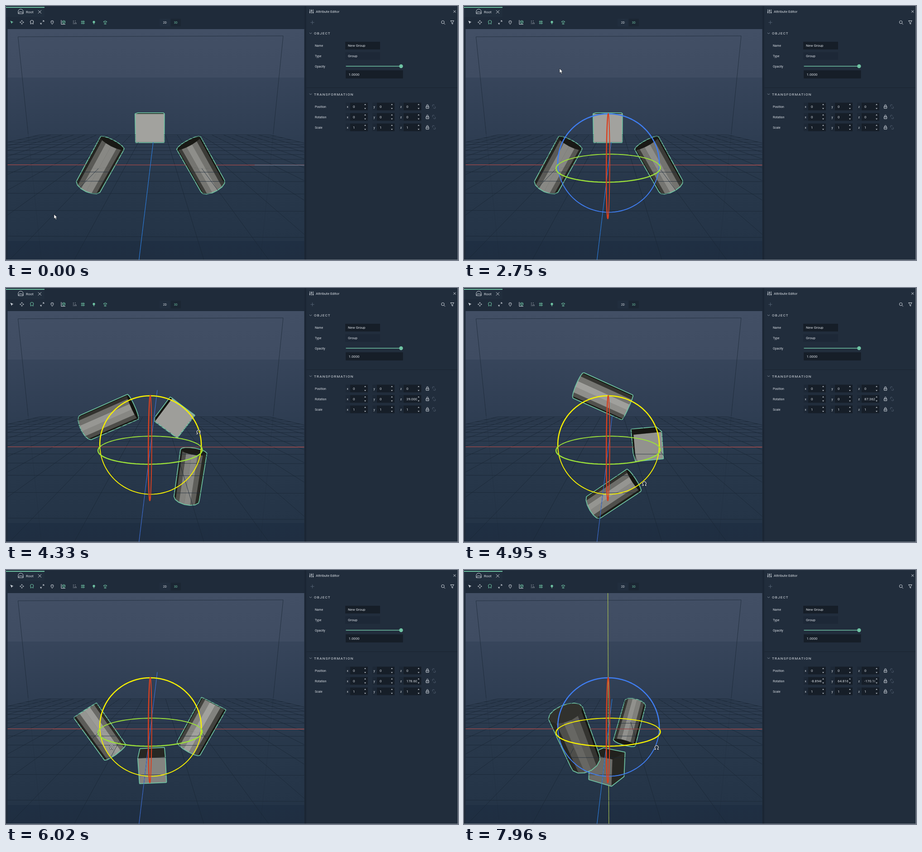
An HTML page for the animation above (8 s loop, 998x561 px).

```html
<!DOCTYPE html>
<html lang="en">
<head>
<meta charset="utf-8">
<title>Group rotation</title>
<style>
  html, body { margin: 0; width: 100%; height: 100%; overflow: hidden; background: #1e2a39; }
  svg { display: block; width: 100vw; height: 100vh; }
  text { font-family: Roboto, "Open Sans", sans-serif; font-size: 7.8px; fill: #d9dee4; }
  .label { font-size: 6.8px; }
  .head { font-size: 8px; letter-spacing: 1.25px; }
  .line { fill: none; stroke: #d3d9e0; stroke-width: 1; }
  .mint { fill: none; stroke: #6fc3a3; stroke-width: 1; }
  .dim { fill: none; stroke: #536173; stroke-width: 1; }
  .field { fill: #161e28; }
</style>
</head>
<body>
<svg viewBox="0 0 998 561" preserveAspectRatio="none">
  <defs>
    <linearGradient id="sky" x1="0" y1="51" x2="0" y2="560" gradientUnits="userSpaceOnUse">
      <stop offset="0" stop-color="#424f65"/>
      <stop offset=".21" stop-color="#3f4c62"/>
      <stop offset=".21" stop-color="#37455b"/>
      <stop offset=".45" stop-color="#2f3e53"/>
      <stop offset=".65" stop-color="#28384b"/>
      <stop offset=".92" stop-color="#243447"/>
      <stop offset=".92" stop-color="#1f2f43"/>
      <stop offset="1" stop-color="#1f2e41"/>
    </linearGradient>
    <clipPath id="view"><rect x="3.5" y="51" width="655" height="509.5"/></clipPath>
  </defs>

  <rect width="998" height="561" fill="#1f2b3a"/>
  <rect x="659" width="4" height="561" fill="#1b2634"/>
  <rect x="663" width="334" height="560" fill="#212d3c"/>

  <!-- tab and toolbar -->
  <rect width="85" height="24" fill="#212e3d"/>
  <rect width="85" height="2" y="2" fill="#6fc3a3"/>
  <path class="line" d="M27 17V11.500Q28 7 32.500 7T38 11.500V17ZM28 16l3-4 2 2 2-1.500 3 3.500M71 9.500l7 7m0-7l-7 7" stroke-width="1.300"/>
  <text x="44" y="15.500" style="font-size:8px">Root</text>
  <path id="pick" d="M9.500 32.500l7 3-3 1-1 3z"/>
  <path class="line" d="M35 32v2.500m0 3V40M31 36h2.500m3 0H39M33.500 33.200L35 31.700l1.500 1.500M33.500 38.800l1.500 1.500 1.500-1.500M32.200 34.500L30.700 36l1.500 1.500M37.800 34.500l1.500 1.500-1.500 1.500"/>
  <path id="turn" d="M53.500 39.500h2.200v-1.300a3.500 3.500 0 1 1 3 0v1.300h2.200" fill="none" stroke-width="1.100"/>
  <path class="line" d="M81 35l2.500-2.500M81 32.200h2.800V35M79 37l-2.500 2.500M76.200 37v2.800H79"/>
  <path class="line" d="M102 40.300q-3-3.300-3-5a3 3 0 0 1 6 0q0 1.700-3 5z"/><circle cx="102" cy="35.300" r=".8" fill="#d3d9e0"/>
  <path class="line" d="M122 31v9.500h9"/><path class="mint" d="M124.500 33.500l3-1.500 3 1.500v4l-3 1.500-3-1.500zl3 1.500 3-1.500m-3 1.500v4"/>
  <path class="line" d="M148 33h1.500m-1.500 3h1.500m-1.500 3h1.500M152 40v-2a1.500 1.500 0 0 1 3 0v2M152 33h1.500" stroke-dasharray="1.800 .7"/>
  <path class="mint" d="M168 32v8.500m3.500-8.500v8.500M165.500 34.300h8.500m-8.500 3.700h8.500"/>
  <path d="M192.800 38q-1.800-1.500-1.500-3a2.800 2.800 0 0 1 5.500 0q.2 1.500-1.500 3zM192.800 38.700h2.500V40h-2.500z" fill="#6fc3a3"/>
  <path class="mint" d="M215 35q4-4 8 0-4 3-8 0zM216.500 39.500q2.500-2 5 0-2.500 1.500-5 0z" stroke-width="1.300"/>
  <rect x="339" y="28" width="23" height="17" fill="#212e3e"/>
  <rect x="364" y="28" width="22" height="17" fill="#1b2633"/>
  <text x="346.800" y="38.500" style="font-size:6.600px">2D</text>
  <text x="370.800" y="38.500" style="font-size:6.600px;fill:#6fc3a3">3D</text>

  <!-- attribute panel -->
  <path class="line" d="M671 7.500v9m3.500-9v9m3.500-9v9M669.500 13.500h3m.5-3h3m.5 4h3" stroke-width="1.200"/>
  <text x="684" y="15">Attribute Editor</text>
  <path class="line" d="M988 9.700l5 5m0-5l-5 5"/>
  <path class="dim" d="M672.500 36.300h8m-4-4v8"/>
  <path class="line" d="M967 38.300l2.500 2.500M981.500 32.500h7.500l-2.700 4v3.500l-2-1.200v-2.300z" stroke-width="1.200"/>
  <circle class="line" cx="964.500" cy="35.700" r="3.200"/>
  <path class="dim" d="M670 59l2.500 2.500 2.500-2.500M670 193.500l2.500 2.500 2.500-2.500" style="stroke:#8793a2"/>
  <text class="head" x="680" y="62.800">OBJECT</text>
  <text class="head" x="680" y="197.500">TRANSFORMATION</text>
  <text class="label" x="682" y="90">Name</text>
  <text class="label" x="682" y="113">Type</text>
  <text class="label" x="682" y="135.700">Opacity</text>
  <rect class="field" x="749" y="79" width="77" height="17"/>
  <rect x="749" y="102" width="77" height="17" fill="#1d2837"/>
  <rect class="field" x="750" y="142" width="126.500" height="18"/>
  <text x="755" y="90.300">New Group</text>
  <text x="755" y="113.300">Group</text>
  <text x="756.500" y="154">1.0000</text>
  <path d="M750.500 133H872" stroke="#6fc3a3" stroke-width="1.500"/>
  <circle cx="872.300" cy="133" r="4.200" fill="#6fc3a3"/>
  <path d="M663 180.500H997" stroke="#1a2431"/>
  <g id="rows"></g>

  <!-- 3D view -->
  <g clip-path="url(#view)">
    <rect x="3" y="51" width="656" height="510" fill="url(#sky)"/>
    <g fill="none" stroke="#1c2938">
      <path d="M49 283L26.500 68 612 66 590 283" stroke-width=".9" opacity=".85"/>
      <path d="M49 283L78 560M590 283L562 560" opacity=".25"/>
    </g>
    <path id="upright" stroke="#a9c254" stroke-width="1.200"/>
    <g id="below"></g>
    <path id="grid" fill="none" stroke="#1a2735" stroke-width=".9" opacity=".85"/>
    <path id="redAxis" stroke="#cb5450" stroke-width="1.100"/>
    <path id="greyAxis" stroke="#7189a0"/>
    <path id="blueAxis" stroke="#2f83e6" stroke-width="1.100"/>
    <g id="above"></g>
    <g id="gizmo" fill="none" stroke-linecap="round"></g>
  </g>
  <path d="M0 560.700H997.600V0" fill="none" stroke="#b4bac1" stroke-width=".7"/>

  <path id="arrow" d="M0 0v10l2.300-2.100 1.700 3.700 1.700-.8-1.600-3.500H7z" fill="#fff" stroke="#10161d" stroke-width=".7"/>
  <g id="loop" fill="none">
    <path d="M-5 4.500h3V3a4 4 0 1 1 4.500 0v1.500H5" stroke="#141b23" stroke-width="2.600"/>
    <path d="M-5 4.500h3V3a4 4 0 1 1 4.500 0v1.500H5" stroke="#f1f3f5" stroke-width="1.200"/>
  </g>
</svg>

<script>
const $ = id => document.getElementById(id);
const DURATION = 8000, CELL = 0.48, RAD = Math.PI / 180;
const SHOW_GIZMO = 2250, GRAB_Z = 3380, GRAB_Y = 6710;
const LAG = 40; // the solids trail the numbers in the panel

const TICKS = [0, 120, 260, 400, 550, 690, 830, 980, 1120, 1270, 1410, 1540, 1690, 1840,
  2250, 2370, 2490, 2610, 2740, 2860, 2980, 3110, 3230, 3380, 3520, 3650, 3900, 4040, 4180, 4330,
  4470, 4590, 4710, 4830, 4950, 5090, 5250, 5420, 5570, 5710, 5860, 6020, 6150,
  6710, 6850, 6990, 7120, 7260, 7400, 7590, 7720, 7840, 7960];

const MOUSE = [[0, 106, 460], [260, 104, 430], [550, 99, 330], [830, 91, 215], [1120, 83, 126],
  [1540, 68, 53], [1840, 56, 32], [2250, 56, 32], [3230, 366, 244], [3650, 375, 254],
  [4330, 425, 318], [4650, 428, 380], [4950, 398, 432], [5420, 297, 450], [6020, 233, 391],
  [6150, 230, 384], [6850, 230, 384], [7400, 278, 397], [7960, 425, 392]];
const SPIN = [[3520, 0], [3650, 3.6954], [3900, 13], [4330, 39], [4950, 87.3624], [5420, 138],
  [5860, 172], [6020, 178.6042], [6110, 184.158]];
const TURN = [[6990, 0], [7120, 3], [7260, 8.5], [7400, 14.994], [7590, 28], [7720, 40], [7960, 65.14]];

function at(keys, t) {
  if (t <= keys[0][0]) return keys[0].slice(1);
  const i = keys.findIndex(k => k[0] > t);
  if (i < 0) return keys[keys.length - 1].slice(1);
  const a = keys[i - 1], b = keys[i], f = (t - a[0]) / (b[0] - a[0]);
  return a.slice(1).map((v, j) => v + (b[j + 1] - v) * f);
}

// camera
const EYE = [0.108, 1.109, 4.12], LAMP = [0, 0.93, 3.5];
const depth = ([x, y, z]) => 4.25 - 0.166 * y - 0.986 * z - 0.01 * x;
function project(p) {
  const [x, y, z] = p, s = 476 / depth(p);
  return [331 + s * (x - 0.108 - 0.0064 * z), 305 - s * (0.986 * y - 0.411 - 0.166 * z)];
}
const path = pts => "M" + pts.map(p => p[0].toFixed(2) + " " + p[1].toFixed(2)).join("L");
const wire = (...pts) => path(pts.map(project));

// vectors
const sub = (a, b) => a.map((v, i) => v - b[i]);
const dot = (a, b) => a[0] * b[0] + a[1] * b[1] + a[2] * b[2];
const unit = a => a.map(v => v / Math.hypot(...a));
const cross = (a, b) => [a[1] * b[2] - a[2] * b[1], a[2] * b[0] - a[0] * b[2], a[0] * b[1] - a[1] * b[0]];
const middle = pts => [0, 1, 2].map(i => pts.reduce((s, p) => s + p[i], 0) / pts.length);
function rotZ([x, y, z], a) {
  const c = Math.cos(a), s = Math.sin(a);
  return [x * c - y * s, x * s + y * c, z];
}
function rotY([x, y, z], a) {
  const c = Math.cos(a), s = Math.sin(a);
  return [x * c + z * s, y, z * c - x * s];
}

function prism(n, radius, height, [px, py], tilt, phase) {
  const points = [], faces = [[], []];
  for (let i = 0; i < n; i++) {
    const a = phase + i * 2 * Math.PI / n, next = (i + 1) % n;
    for (const side of [-0.5, 0.5]) {
      const [x, y, z] = rotZ([radius * Math.cos(a), side * height, radius * Math.sin(a)], tilt);
      points.push([x + px, y + py, z]);
    }
    faces[0].push(2 * i);
    faces[1].push(2 * i + 1);
    faces.push([2 * i, 2 * i + 1, 2 * next + 1, 2 * next]);
  }
  return { points, faces };
}
const SOLIDS = [
  prism(4, 0.505 / Math.SQRT2, 0.505, [0, 0.75], 0, Math.PI / 4),
  prism(14, 0.25, 1, [-0.99, 0], -30 * RAD, 0.1),
  prism(14, 0.25, 1, [0.99, 0], 30 * RAD, 0.1)
];

function hull(pts) {
  const sorted = [...pts].sort((a, b) => a[0] - b[0] || a[1] - b[1]);
  const half = list => {
    const out = [];
    for (const p of list) {
      while (out.length > 1) {
        const [a, b] = out.slice(-2);
        if ((b[0] - a[0]) * (p[1] - a[1]) - (b[1] - a[1]) * (p[0] - a[0]) > 0) break;
        out.pop();
      }
      out.push(p);
    }
    return out.slice(0, -1);
  };
  return half(sorted).concat(half(sorted.reverse()));
}

// part of a polygon above (sign 1) or below (sign -1) the ground
function cut(poly, sign) {
  const out = [];
  poly.forEach((p, i) => {
    const q = poly[(i + 1) % poly.length], a = p[1] * sign, b = q[1] * sign;
    if (a >= 0) out.push(p);
    if (a * b < 0) out.push(p.map((v, j) => v + (q[j] - v) * a / (a - b)));
  });
  return out;
}

function grey(center, normal) {
  const c = Math.max(0, dot(normal, unit(sub(LAMP, center))));
  const v = Math.round(18 + 144 * c ** 2);
  return `rgb(${v},${v},${v - 4})`;
}

function drawSolids(spin, turn) {
  let low = "", high = "";
  const solids = SOLIDS.map(({ points, faces }) => {
    const pts = points.map(p => rotY(rotZ(p, spin), turn));
    return { pts, faces, core: middle(pts) };
  }).sort((a, b) => depth(b.core) - depth(a.core));
  for (const { pts, faces, core } of solids) {
    low += `<path d="${path(hull(pts.map(project)))}Z" fill="#2a2b28" stroke="#6fc3a3" stroke-width="4" stroke-linejoin="round"/>`;
    for (const face of faces) {
      const poly = face.map(i => pts[i]), center = middle(poly);
      let normal = unit(cross(sub(poly[1], poly[0]), sub(poly[2], poly[0])));
      if (dot(normal, sub(center, core)) < 0) normal = normal.map(v => -v);
      if (dot(normal, sub(EYE, center)) <= 0) continue;
      const color = grey(center, normal);
      const piece = sign => {
        const part = cut(poly, sign);
        return part.length > 2 ? `<path d="${wire(...part)}Z" fill="${color}" stroke="${color}" stroke-width=".4"/>` : "";
      };
      low += piece(-1);
      high += piece(1);
    }
  }
  $("below").innerHTML = low;
  $("above").innerHTML = high;
}

// each ring has a thin far half and a thick near half
function ring(place, color) {
  const halves = ["", ""], n = 96;
  for (let i = 0; i < n; i++) {
    const p = place(i * 2 * Math.PI / n), q = place((i + 1) * 2 * Math.PI / n);
    halves[depth(p) < 4.25 ? 1 : 0] += wire(p, q);
  }
  return halves.map((d, i) => `<path d="${d}" stroke="${color}" stroke-width="${i ? 2.5 : 1.9}"/>`).join("");
}
const { cos, sin } = Math;
function drawGizmo(held) {
  const tint = (axis, color) => axis === held ? "#f6f000" : color;
  $("gizmo").innerHTML =
    ring(a => [cos(a), sin(a), 0], tint("z", "#3f7df0")) +
    ring(a => [cos(a), 0, sin(a)], tint("y", "#9be03a")) +
    ring(a => [0, cos(a), sin(a)], "#d9401f");
}

function buildStatic() {
  let d = "";
  const edge = 10 * CELL;
  for (let k = -10; k <= 10; k++) {
    const v = k * CELL;
    d += wire([v, 0, -edge], [v, 0, 3]);
    if (k < 6) d += wire([-edge, 0, v], [edge, 0, v]);
  }
  $("grid").setAttribute("d", d);
  $("redAxis").setAttribute("d", wire([-edge, 0, 0], [edge, 0, 0]));
  $("upright").setAttribute("d", wire([0, -4, 0], [0, 6, 0]));

  let rows = "";
  for (let c = 0; c < 3; c++)
    rows += `<clipPath id="col${c}"><rect x="${764 + 59 * c}" y="210" width="25.500" height="70"/></clipPath>`;
  ["Position", "Rotation", "Scale"].forEach((name, r) => {
    const y = 222 + r * 23;
    rows += `<text class="label" x="682" y="${y + 2.6}">${name}</text>`;
    for (let c = 0; c < 3; c++) {
      const x = 750 + 59 * c;
      rows += `<rect x="${x}" y="${y - 8.500}" width="11" height="17" fill="#1d2836"/>
        <rect class="field" x="${x + 10}" y="${y - 8.500}" width="39" height="17"/>
        <text class="label" x="${x + 2.500}" y="${y + 2.500}">${"xyz"[c]}</text>
        <g clip-path="url(#col${c})"><text id="v${r}${c}" x="${x + 16}" y="${y + 2.800}">${r === 2 ? 1 : 0}</text></g>
        <path d="M${x + 41} ${y - 3.500}h4l-2-2.200zM${x + 41} ${y + 3.500}h4l-2 2.200z" fill="#d3d9e0"/>`;
    }
    rows += `<path class="line" d="M927.500 ${y - 0.500}h6v4.500h-6zM928.800 ${y - 0.500}v-2a1.700 1.700 0 0 1 3.400 0v2M930.500 ${y + 1}v1.500"/>
      <path class="dim" d="M943 ${y + 0.500}q-3-2-1-4 2-1.500 4 .5M946.500 ${y - 0.500}q3 2 1.500 4-2 1.500-4.500-.5"/>`;
  });
  $("rows").innerHTML = rows;
}

const degrees = v => Math.abs(v) < 1e-6 ? "0" : (v / RAD).toFixed(4);
const pose = t => [-at(SPIN, t)[0] * RAD, at(TURN, t)[0] * RAD];

function render(now) {
  const t = TICKS.filter(k => k <= now).pop();
  const gizmo = t >= SHOW_GIZMO;
  const held = t >= GRAB_Y ? "y" : t >= GRAB_Z ? "z" : "";

  drawSolids(...pose(t - LAG));
  if (gizmo) drawGizmo(held);
  $("gizmo").style.display = gizmo ? "" : "none";
  $("upright").style.display = held === "y" ? "" : "none";
  $("greyAxis").setAttribute("d", gizmo ? "" : "M549 351.300L659 351.700");
  $("blueAxis").setAttribute("d", wire([0, 0, held === "z" ? -900 : -10 * CELL], [0, 0, 3]));
  $("blueAxis").setAttribute("stroke", held === "z" ? "#4173dc" : "#2f83e6");
  $("pick").setAttribute("fill", gizmo ? "#d3d9e0" : "#6fc3a3");
  $("turn").setAttribute("stroke", gizmo ? "#6fc3a3" : "#d3d9e0");

  const [spin, turn] = pose(t);
  const euler = [
    -Math.atan2(sin(turn) * sin(spin), cos(turn)),
    -Math.asin(sin(turn) * cos(spin)),
    -Math.atan2(sin(spin), cos(turn) * cos(spin))
  ];
  euler.forEach((v, i) => { $("v1" + i).textContent = degrees(v); });

  const [x, y] = at(MOUSE, t);
  for (const id of ["arrow", "loop"]) {
    $(id).setAttribute("transform", `translate(${x} ${y})`);
    $(id).style.display = (id === "loop") === !!held ? "" : "none";
  }
}

buildStatic();
const start = performance.now();
function frame() {
  render((performance.now() - start) % DURATION);
  requestAnimationFrame(frame);
}
frame();
</script>
</body>
</html>
```
